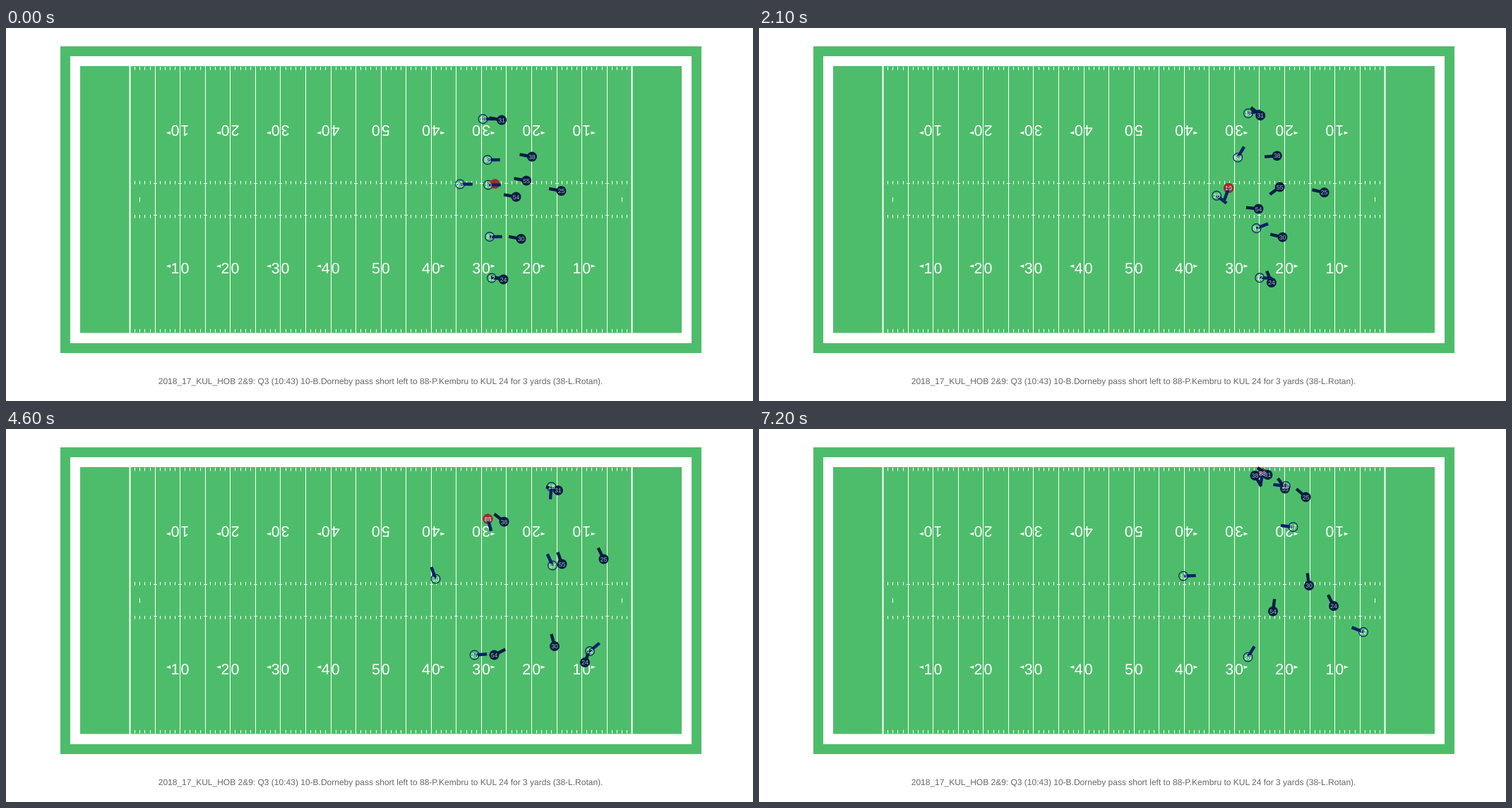
Write an HTML page that moves like this. It is 1058 px wide and 529 px high and loops after 7300 ms.

```html
<!DOCTYPE html>
<html lang="en">
<head>
<meta charset="utf-8">
<title>Play tracking</title>
<style>
  html, body { margin: 0; width: 100%; height: 100%; overflow: hidden; background: #fff; }
  svg { display: block; width: 100vw; height: 100vh; }
  text { font-family: "Liberation Sans", Arial, sans-serif; text-anchor: middle; text-rendering: geometricPrecision; }
  .yard { font-size: 21.4px; letter-spacing: 2px; fill: #fff; }
  .jersey { font-size: 8.6px; }
  .caption { font-size: 12px; fill: #666; }
</style>
</head>
<body>
<svg viewBox="0 0 1058 529">
  <g id="field"></g>
  <g id="home"></g>
  <g id="ball"></g>
  <g id="away"></g>
  <g id="facing"></g>
  <g id="labels"></g>
  <text class="caption" x="530.6" y="505">2018_17_KUL_HOB 2&amp;9: Q3 (10:43) 10-B.Dorneby pass short left to 88-P.Kembru to KUL 24 for 3 yards (38-L.Rotan).</text>
</svg>
<script>
const LOOP = 7300, STEP = 100;
const SNAP = 1100, THROW = 3800, CATCH = 4500;
const GREEN = '#4ebd6b', BLUE = '#0b2265', NAVY = '#041e42';
const GOAL = 175.1, YARD = 7.111, TOP = 54, BOTTOM = 432.5;

function make(parent, tag, attrs, text = '') {
  const el = document.createElementNS('http://www.w3.org/2000/svg', tag);
  for (const k in attrs) el.setAttribute(k, attrs[k]);
  el.textContent = text;
  document.getElementById(parent).appendChild(el);
  return el;
}

// ---- field ----
function box(x1, y1, x2, y2, fill) {
  make('field', 'rect', { x: x1, y: y1, width: x2 - x1, height: y2 - y1, fill });
}
function line(x1, y1, x2, y2, w = 1) {
  make('field', 'path', { d: `M${x1} ${y1}L${x2} ${y2}`, stroke: '#fff', 'stroke-width': w });
}

function yardNumber(x, y, yd) {
  const flip = y < 200, side = Math.sign(yd - 50);
  make('field', 'text', {
    class: 'yard', x: x + 1, y: y + 7.5, transform: `rotate(${flip ? 180 : 0} ${x} ${y})`
  }, Math.min(yd, 100 - yd));
  if (!side) return;
  const ty = y + (flip ? 3 : -3), base = x + side * 13.4, tip = x + side * 19.6;
  make('field', 'path', { d: `M${base} ${ty - 2.3}L${tip} ${ty}L${base} ${ty + 2.3}Z`, fill: '#fff' });
}

function drawField() {
  box(77, 26, 985, 461, GREEN);
  box(91, 40, 971, 447, '#fff');
  box(105, TOP, 957, BOTTOM, GREEN);
  for (let yd = 0; yd <= 100; yd++) {
    const at = GOAL + yd * YARD, x = Math.round(at) + 0.5;
    const goal = yd % 100 === 0;
    if (yd % 5) {
      for (const y of [55, 217, 265, 427]) line(x, y, x, y + 4.6);
    } else {
      line(x, TOP, x, BOTTOM, goal ? 2 : 1);
      if (!goal) for (const y of [220.5, 265.5]) line(x - 2.5, y, x + 2.5, y);
    }
    if (yd === 2 || yd === 98) line(x, 240, x, 246.5);
    if (yd % 10 === 0 && !goal) {
      for (const y of [145.7, 340.8]) yardNumber(at + 0.2, y, yd);
    }
  }
}

// ---- motion ----
const MOVES = [0, 2700, 3800, 4600, 6100, 7200];
const TURNS = [0, 2700, 4600, 7200];
const STANCE = { home: 0, away: 190 };

// Eases off from rest, then follows a smooth curve through the key values
function curve(times, vals) {
  const span = i => times[i + 1] - times[i];
  const rate = i => (vals[i + 1] - vals[i]) / span(i);
  const slope = i => i === vals.length - 1 ? rate(i - 1)
    : (rate(i - 1) * span(i) + rate(i) * span(i - 1)) / (span(i - 1) + span(i));
  return t => {
    let i = 0;
    while (i < times.length - 2 && t >= times[i + 1]) i++;
    const h = span(i), s = (t - times[i]) / h, r = 1 - s;
    const a = vals[i], b = vals[i + 1];
    if (i === 0) return a + (b - a) * s ** 3;
    return a * (1 + 2 * s) * r * r + b * s * s * (3 - 2 * s)
      + h * s * r * (slope(i) * r - slope(i + 1) * s);
  };
}

const updates = [];

// path: places at MOVES; turns: facing in degrees at TURNS after the stance
function player(team, number, path, turns) {
  const home = team === 'home';
  const dot = make(team, 'circle', home
    ? { r: 6.4, fill: 'none', stroke: BLUE, 'stroke-width': 1.1 }
    : { r: 7, fill: NAVY });
  const bar = make('facing', 'path', { d: 'M0 0H17.7', stroke: home ? BLUE : NAVY, 'stroke-width': 4.4 });
  const label = make('labels', 'text', { class: 'jersey', y: 3.1, fill: home ? '#fff' : '#b0b7bc' }, number);
  const x = curve(MOVES, path.map(p => p[0]));
  const y = curve(MOVES, path.map(p => p[1]));
  const angle = curve(TURNS, [STANCE[team], ...turns]);
  const place = t => [x(t), y(t)];
  updates.push(t => {
    const at = `translate(${place(t)})`;
    dot.setAttribute('transform', at);
    label.setAttribute('transform', at);
    bar.setAttribute('transform', `${at} rotate(${angle(t)})`);
  });
  return place;
}

const passer = player('home', 10, [[683, 222.5], [645, 232], [621, 219], [608.5, 212.5], [596.5, 207.5], [601, 208.5]], [233, 250, 358]);
const catcher = player('home', 88, [[682, 187], [674, 180], [676, 157], [682.5, 127.5], [702, 81.5], [713, 63]], [-128, -285, -261]);
player('home', 18, [[675.5, 129], [712.5, 112], [759, 90], [772.5, 82], [757, 80], [746, 81]], [-24, 95, 187]);
player('home', 26, [[643, 221.5], [654, 256], [653, 298.5], [663.5, 320.5], [686.5, 333], [692.5, 323.5]], [80, -4, -59]);
player('home', 87, [[685, 296], [726.5, 270.5], [767.5, 230.5], [774, 193.5], [767.5, 143.5], [756.5, 139]], [-45, -114, -173]);
player('home', 12, [[688, 354.5], [733, 354], [790, 338], [827, 315], [858, 292.5], [856, 288]], [4, -40, -158]);
player('away', 31, [[702, 130.5], [719.5, 117], [764.5, 94], [782, 87], [746, 83], [720.5, 65]], [255, 196, 215]);
player('away', 38, [[745, 182.5], [721, 180], [718, 163.5], [705.5, 131.5], [692, 82], [702.5, 66]], [160, 218, 420]);
player('away', 55, [[737, 216.5], [738.5, 235.5], [771.5, 223.5], [787.5, 191.5], [766.5, 122], [745, 84.5]], [90, -110, -125]);
player('away', 54, [[722.5, 239.5], [690.5, 275.5], [679.5, 309.5], [691.5, 320.5], [721.5, 292], [728, 258.5]], [181, -27, -83]);
player('away', 25, [[786.5, 231], [816.5, 236], [841.5, 215.5], [846.5, 184.5], [808, 130], [774.5, 96.5]], [197, 244, 221]);
player('away', 30, [[729.5, 299], [755, 294], [767, 309.5], [777, 308], [779, 262], [779, 222]], [197, 255, 263]);
player('away', 24, [[704.5, 356.5], [750, 366], [795, 356.5], [820, 331], [828, 277.5], [814, 251]], [313, 290, 243]);

// The ball waits for the snap, is carried, flies straight, and is carried again
function ballPlace(t) {
  if (t < SNAP) return [692.5, 221];
  if (t < THROW) return passer(t);
  if (t >= CATCH) return catcher(t);
  const from = passer(THROW), to = catcher(CATCH), s = (t - THROW) / (CATCH - THROW);
  return from.map((v, i) => v + (to[i] - v) * s);
}

const ball = make('ball', 'circle', { r: 7, fill: '#a82a2c' });
updates.push(t => ball.setAttribute('transform', `translate(${ballPlace(t)})`));

function frame() {
  const t = Math.floor(performance.now() % LOOP / STEP) * STEP;
  for (const update of updates) update(t);
  requestAnimationFrame(frame);
}

drawField();
frame();
</script>
</body>
</html>
```
